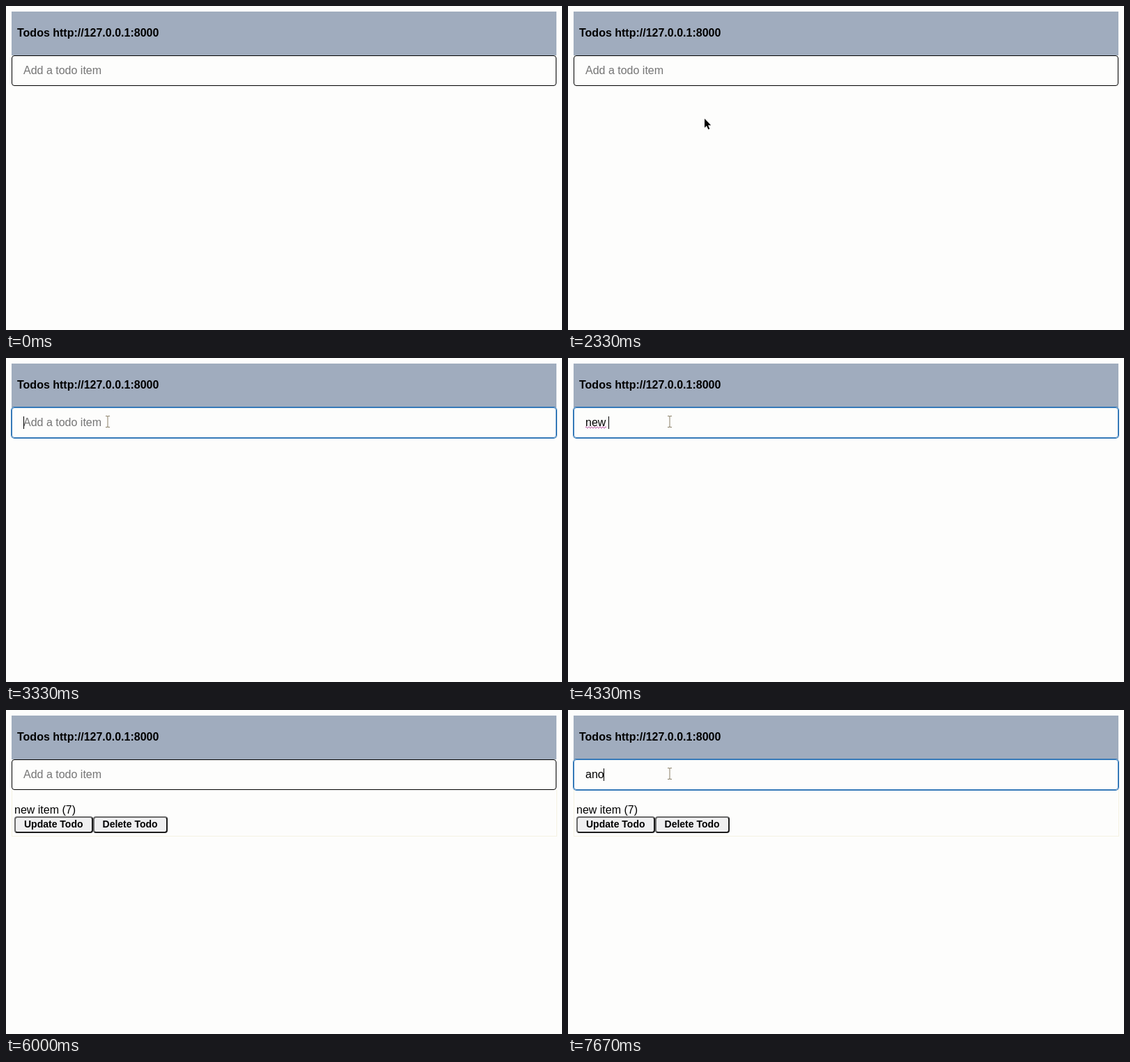
Recreate the animation shown at these times as an HTML page. Size 798x466 px, loop 8000 ms.

```html
<!DOCTYPE html>
<html lang="en">
<head>
<meta charset="utf-8">
<title>Todos</title>
<style>
  html, body {
    margin: 0;
    width: 100%;
    height: 100%;
    overflow: hidden;
    background: #fdfdfc;
  }
  body {
    position: relative;
    color: #000;
    font: 16px/18px "Liberation Sans", Arial, sans-serif;
    white-space: pre;
  }
  body * { box-sizing: border-box; }
  header, .field, .hint, .typed, .item, .pointer, .ibeam, .wave { position: absolute; }

  /* every animation is one hard-stepped 8 s loop */
  .anim { animation: 8s step-end infinite; }

  header {
    left: 8px; top: 8px; width: 782px; height: 63px;
    padding: 22px 8px;
    background: #a0acbe;
    font-weight: bold;
  }
  .field {
    left: 8px; top: 71px; width: 782px; height: 44px;
    border: 1px solid #000;
    border-radius: 4px;
    animation-name: focus;
  }
  .hint { left: 25px; top: 84px; color: #757575; animation-name: hint; }

  /* the right border is the text caret */
  .typed {
    left: 25px; top: 84px; width: 1px; height: 18px;
    overflow: hidden;
    border-right: 1px solid #000;
    opacity: 0;
  }
  .first { animation-name: type-first; }
  .second { animation-name: type-second; }
  .wave { left: 25px; top: 98px; opacity: 0; animation-name: wave; }

  .item {
    left: 8px; top: 115px; width: 783px; height: 67px;
    padding: 20px 3px 0;
    border: 1px solid #f4f2e2;
    border-top: 0;
    opacity: 0;
    animation-name: item;
  }
  .buttons { display: flex; }
  .buttons span {
    height: 24px;
    padding: 1px 12px 3px;
    border: 2px solid;
    border-color: #6b6b6b #1c1c1c #1c1c1c #6b6b6b;
    border-radius: 4px;
    background: #efeff0;
    font: bold 14px/16px "Liberation Sans", Arial, sans-serif;
  }

  .pointer { left: 0; top: 0; opacity: 0; animation-name: pointer; }
  .ibeam { left: 142px; top: 83px; opacity: 0; animation-name: ibeam; }

  @keyframes pointer {
    0% { opacity: 0; }
    20.875% { opacity: 1; transform: translate(466px, 365px); }
    25% { opacity: 1; transform: translate(404px, 192px); }
    29.125% { opacity: 1; transform: translate(195px, 161px); }
    33.375%, 100% { opacity: 0; }
  }
  @keyframes ibeam {
    0%, 62.5% { opacity: 0; }
    33.375%, 79.125%, 100% { opacity: 1; }
  }
  @keyframes focus {
    0%, 66.625% { border-color: #000; box-shadow: none; }
    37.5% { border-color: #a3c0df; box-shadow: none; }
    41.625%, 87.5%, 100% { border-color: #3579b8; box-shadow: 0 0 0 1px #3579b8; }
  }
  @keyframes hint {
    0%, 66.625% { opacity: 1; }
    45.875%, 95.875%, 100% { opacity: 0; }
  }
  @keyframes type-first {
    0% { opacity: 0; width: 1px; }
    37.5% { opacity: 1; width: 1px; }
    45.875% { opacity: 1; width: 30px; }
    54.125% { opacity: 1; width: 34px; }
    58.375% { opacity: 1; width: 51px; }
    62.5% { opacity: 1; width: 65px; }
    66.625%, 100% { opacity: 0; width: 1px; }
  }
  @keyframes type-second {
    0%, 91.625% { opacity: 0; width: 1px; }
    83.375% { opacity: 1; width: 1px; }
    95.875%, 100% { opacity: 1; width: 27px; }
  }
  @keyframes wave {
    0%, 66.625%, 100% { opacity: 0; }
    54.125% { opacity: 1; }
  }
  @keyframes item {
    0% { opacity: 0; }
    75%, 100% { opacity: 1; }
  }
</style>
</head>
<body>
<header>Todos http://127.0.0.1:8000</header>
<div class="item anim"><div>new item (7)</div><div class="buttons"><span>Update Todo</span><span>Delete Todo</span></div></div>
<div class="field anim"></div>
<div class="hint anim">Add a todo item</div>
<div class="typed first anim">new item</div>
<div class="typed second anim">ano</div>
<svg class="wave anim" width="30" height="4" fill="none" stroke="#b858a4">
  <path d="M0 2q1 -2.4 2 0t2 0t2 0t2 0t2 0t2 0t2 0t2 0t2 0t2 0t2 0t2 0t2 0t2 0t2 0"/>
</svg>
<svg class="ibeam anim" width="8" height="18" fill="none" stroke="#8a8068">
  <path d="M1 .5h2.5l.5 .8l.5 -.8h2.5M4 1v15.5M1 16.5h2.5l.5 -.8l.5 .8h2.5"/>
</svg>
<svg class="pointer anim" width="12" height="19">
  <path d="M1 1V14L4 11.2L6.3 16.6L8.3 15.8L6 10.4H10.2Z"/>
</svg>
</body>
</html>
```
